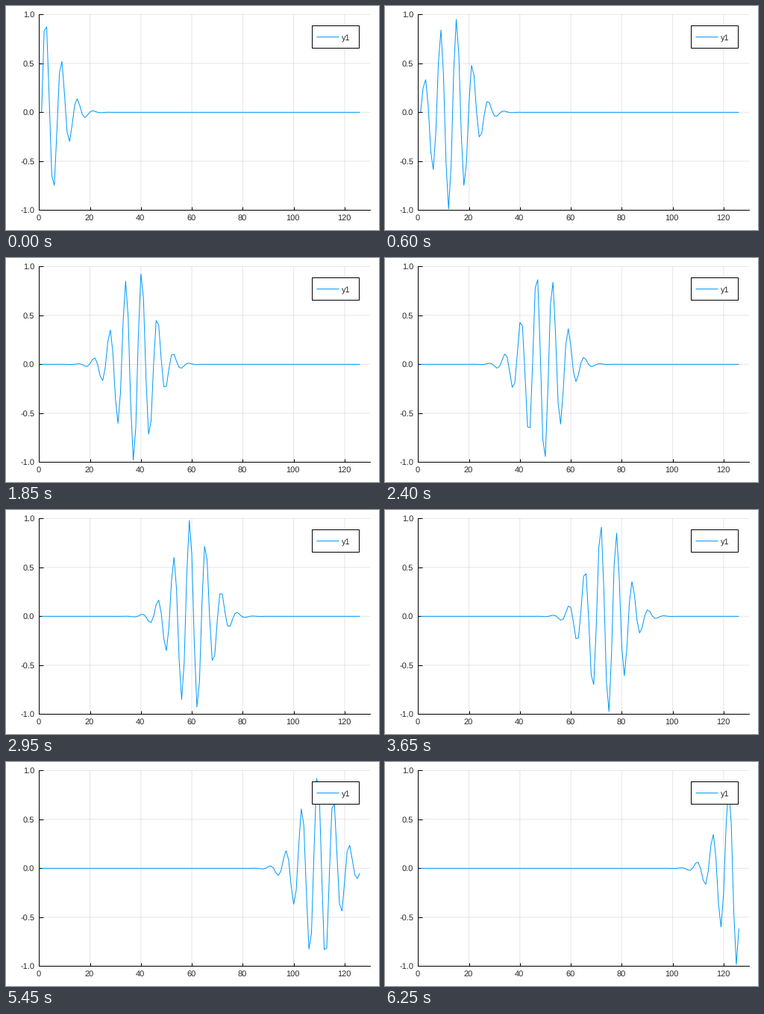
Animation of 500x300 px, one loop 6300 ms. Source, as a matplotlib script:

```python
import numpy as np
import matplotlib.pyplot as plt
from matplotlib.animation import FuncAnimation
from matplotlib.patches import Rectangle
from matplotlib.transforms import ScaledTranslation

W, H, DPI = 500, 300, 100
LEFT, RIGHT, TOP, BOTTOM = 44.3, 488, 11.4, 273.4
PX = 72 / DPI  # one pixel in points
BLUE = "#009afa"
INK = "#262626"

plt.rcParams.update({
    "font.family": "Liberation Sans",
    "font.size": 11 * PX,
    "text.hinting": "no_hinting",
    "axes.unicode_minus": False,
    "lines.solid_capstyle": "butt",
    "lines.solid_joinstyle": "miter",
})

x = np.arange(0, 2 * np.pi, 0.05)
index = np.arange(1, len(x) + 1)


def packet(t):
    """Gaussian window centred on t over a fixed sine."""
    return np.sin(20 * x) * np.exp(-4 * (x - t) ** 2)


fig = plt.figure(figsize=(W / DPI, H / DPI), dpi=DPI, facecolor="white")
ax = fig.add_axes([LEFT / W, 1 - BOTTOM / H, (RIGHT - LEFT) / W, (BOTTOM - TOP) / H])
ax.set(xlim=(0, 130), ylim=(-1, 1),
       xticks=range(0, 121, 20), yticks=np.linspace(-1, 1, 5))
ax.set_axisbelow(True)
ax.grid(color="black", alpha=0.1, lw=PX, snap=False)
ax.spines[["top", "right"]].set_visible(False)
ax.spines[["left", "bottom"]].set_linewidth(PX)
ax.tick_params(direction="in", width=PX, labelcolor=INK)
ax.tick_params(axis="x", length=4 * PX, pad=5.5 * PX)
ax.tick_params(axis="y", length=6 * PX, pad=6 * PX)

nudge = ScaledTranslation(-0.8 / DPI, 0, fig.dpi_scale_trans)
for label in ax.get_xticklabels():
    label.set_transform(label.get_transform() + nudge)

line, = ax.plot(index, packet(0), color=BLUE, lw=PX)

# Legend, laid out in pixels
over = fig.add_axes([0, 0, 1, 1], zorder=5)
over.set(xlim=(0, W), ylim=(H, 0))
over.axis("off")
over.add_patch(Rectangle((410, 26), 63, 30, fc="white", ec="black", lw=PX))
over.plot([416, 445.5], [41, 41], color=BLUE, lw=PX)
over.text(449.6, 46, "y1", color=INK, va="baseline")


def update(i):
    line.set_ydata(packet(x[i]))
    return line,


anim = FuncAnimation(fig, update, frames=len(x), interval=50,
                     repeat=True, repeat_delay=0, blit=False)
plt.show()
```
